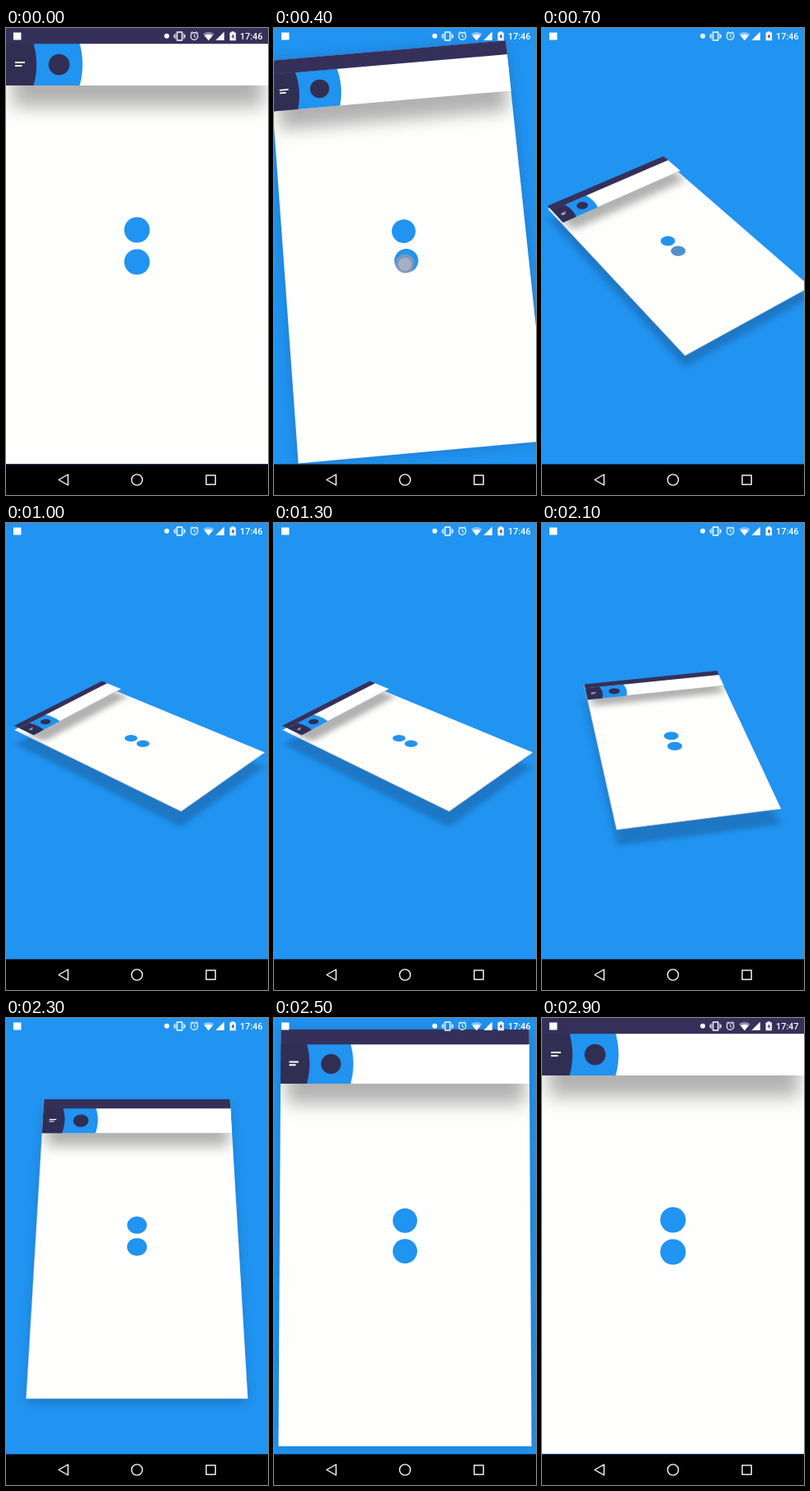
These frames come from a looping animation (320x569 px, 3 s). An HTML page:

```html
<!DOCTYPE html>
<html lang="en">
<head>
<meta charset="utf-8">
<title>Tilting sheet</title>
<style>
  html, body { margin: 0; width: 100%; height: 100%; overflow: hidden; background: #000; }
  svg { display: block; width: 100vw; height: 100vh; }
  text { font: 500 11px Roboto, sans-serif; fill: #fff; }
</style>
</head>
<body>
<svg viewBox="0 0 320 569">
  <defs>
    <clipPath id="clip"><path id="clipShape"/></clipPath>
    <filter id="dropBlur" x="-30%" y="-30%" width="160%" height="160%"><feGaussianBlur id="dropDev"/></filter>
    <filter id="barBlur" x="-40%" y="-80%" width="180%" height="260%"><feGaussianBlur id="barDev"/></filter>
  </defs>
  <rect width="320" height="569" fill="#2193f0"/>
  <path id="drop" fill="#173f70" filter="url(#dropBlur)"/>
  <path id="sheet" fill="#fefefd"/>
  <path id="edge" fill="none" stroke="#c9c6c2" stroke-width=".8"/>
  <g clip-path="url(#clip)"><path id="barShade" fill="#000" fill-opacity=".3" filter="url(#barBlur)"/></g>
  <path id="dotA" fill="#2193f0"/>
  <path id="dotB" fill="#2193f0"/>
  <path id="ripple" fill="#8f9094"/>
  <path id="bar" fill="#fff"/>
  <path id="barEdge" fill="none" stroke="#a8a6a4" stroke-width=".7"/>
  <path id="blue" fill="#2193f0"/>
  <path id="dark" fill="#312e54"/>
  <path id="strip" fill="#35305a"/>
  <path id="menu" fill="#fff"/>
  <path id="badge" fill="#312e54"/>
  <g id="touch">
    <circle cx="160" cy="287" r="11.5" fill="#8f98b2" fill-opacity=".85"/>
    <circle cx="160" cy="288" r="8" fill="#b0b5c6" fill-opacity=".8"/>
  </g>
  <g fill="#fff">
    <rect x="9" y="5.5" width="9.5" height="9"/>
    <circle cx="196.3" cy="9.7" r="3"/>
    <path d="M209 5h6v10h-6z" fill="none" stroke="#fff" stroke-width="1.3"/>
    <path d="M207 6.5v7M217 6.5v7M205.4 8v4M218.6 8v4" stroke="#fff"/>
    <circle cx="230" cy="10" r="4.3" fill="none" stroke="#fff" stroke-width="1.2"/>
    <path d="M230 7.5v2.8l2 1.3M225.3 6.4l2.4-2M234.7 6.4l-2.4-2" fill="none" stroke="#fff"/>
    <path d="M240.6 7.2q6.8-4.4 13.6 0l-6.8 8z" fill-opacity=".45"/>
    <path d="M242.4 9.3q5-2.6 10 0l-5 5.9z"/>
    <path d="M256 15h10.5v-10.5z"/>
    <path d="M273.3 5.5h2v-1.2h3.4v1.2h2v9.7h-7.4z"/>
    <path d="M277.7 7l-2.6 3.7h1.7v2.8l2.5-3.8h-1.6z" fill="#474267"/>
    <text id="clock" x="285.7" y="14">17:46</text>
  </g>
  <rect y="531.5" width="320" height="38"/>
  <g fill="none" stroke="#fff" stroke-width="1.4">
    <path d="M64.3 550.5L75.8 544v13z" stroke-linejoin="round"/>
    <circle cx="160" cy="550.5" r="6.6"/>
    <rect x="244.5" y="545" width="11.2" height="11.2"/>
  </g>
</svg>
<script>
const LOOP = 3000, STEP = 100;
const W = 320, H = 531, CX = 160, CY = 265.5, DEPTH = 1100;
const $ = id => document.getElementById(id);
const clamp = v => Math.max(0, Math.min(1, v));
const ease = v => (1 - Math.cos(Math.PI * clamp(v))) / 2;

// rises over [a, a + da], falls back over [b, b + db]
const swing = (t, a, da, b, db) => ease((t - a) / da) - ease((t - b) / db);

function pose(t) {
  const turn = swing(t, 257, 686, 1690, 600);
  const tilt = swing(t, 259, 625, 2010, 562);
  const shrink = swing(t, 261, 571, 1925, 710);
  return {
    rz: -49 * turn * Math.PI / 180,
    rx: 59 * tilt * Math.PI / 180,
    scale: 1 - 0.5 * shrink,
    lift: 12 * turn,
    drop: 42 * tilt,
    tilt
  };
}

function camera({ rz, rx, scale }) {
  const cz = Math.cos(rz), sz = Math.sin(rz), cx = Math.cos(rx), sx = Math.sin(rx);
  return (x, y, z = 0) => {
    const px = (x - CX) * cz - (y - CY) * sz;
    const py = (x - CX) * sz + (y - CY) * cz;
    const k = scale * DEPTH / (DEPTH - scale * (py * sx + z * cx));
    return [CX + px * k, CY + (py * cx - z * sx) * k];
  };
}

const rect = (x, y, w, h) => [[x, y], [x + w, y], [x + w, y + h], [x, y + h]];

function disc(x, y, r) {
  return Array.from({ length: 48 }, (_, i) => {
    const a = i * Math.PI / 24;
    return [x + r * Math.cos(a), y + r * Math.sin(a)];
  });
}

// toolbar section from the left side to a bowed right side
function bowed(right, bulge) {
  const pts = [[0, 70], [0, 19]];
  for (let i = 0; i <= 16; i++) {
    const u = i / 16;
    pts.push([right + bulge * 4 * u * (1 - u), 19 + 51 * u]);
  }
  return pts;
}

function render(time) {
  const t = Math.floor((time % LOOP) / STEP) * STEP;
  const p = pose(t), at = camera(p);
  const line = (pts, z) => 'M' + pts.map(([x, y]) => at(x, y, z).map(v => v.toFixed(2)).join(' ')).join('L');
  const shape = (pts, z) => line(pts, z) + 'Z';
  const set = (id, d) => $(id).setAttribute('d', d);
  const fade = (id, v) => $(id).setAttribute('opacity', v.toFixed(3));
  const blur = (id, r) => $(id).setAttribute('stdDeviation',
    `${(r * p.scale).toFixed(2)} ${(r * p.scale * Math.cos(p.rx)).toFixed(2)}`);

  const page = rect(0, 0, W, H);
  set('sheet', shape(page));
  set('clipShape', shape(page));
  set('edge', line([[0, 0], [0, H], [W, H]]));
  fade('edge', p.tilt);

  set('drop', shape(page, -p.drop));
  fade('drop', 0.33);
  blur('dropDev', 8);

  set('barShade', shape(rect(8, 40, 306, 56)));
  blur('barDev', 11);

  set('dotA', shape(disc(160, 246, 15.6)));
  set('dotB', shape(disc(160, 285, 15.6)));
  set('ripple', shape(disc(160, 285, 15.6)));
  fade('ripple', t < 500 ? 0 : 0.45 * clamp((1000 - t) / 300));

  set('bar', shape(rect(0, 19, W, 51), p.lift));
  set('barEdge', line([[0, 70], [W, 70]], p.lift));
  fade('barEdge', p.tilt);
  set('blue', shape(bowed(90, 3.5), p.lift));
  set('dark', shape(bowed(33.7, 3.5), p.lift));
  set('strip', shape(rect(0, 0, W, 19.3), p.lift));
  set('menu', shape(rect(11, 41, 12, 2), p.lift) + shape(rect(11, 45, 8.5, 2), p.lift));
  set('badge', shape(disc(64.8, 44.6, 12.8), p.lift));

  fade('touch', t < 300 ? 0 : clamp((600 - t) / 200));
  $('clock').textContent = t < 2700 ? '17:46' : '17:47';
}

const start = performance.now();
function tick() {
  render(performance.now() - start);
  requestAnimationFrame(tick);
}
tick();
</script>
</body>
</html>
```
